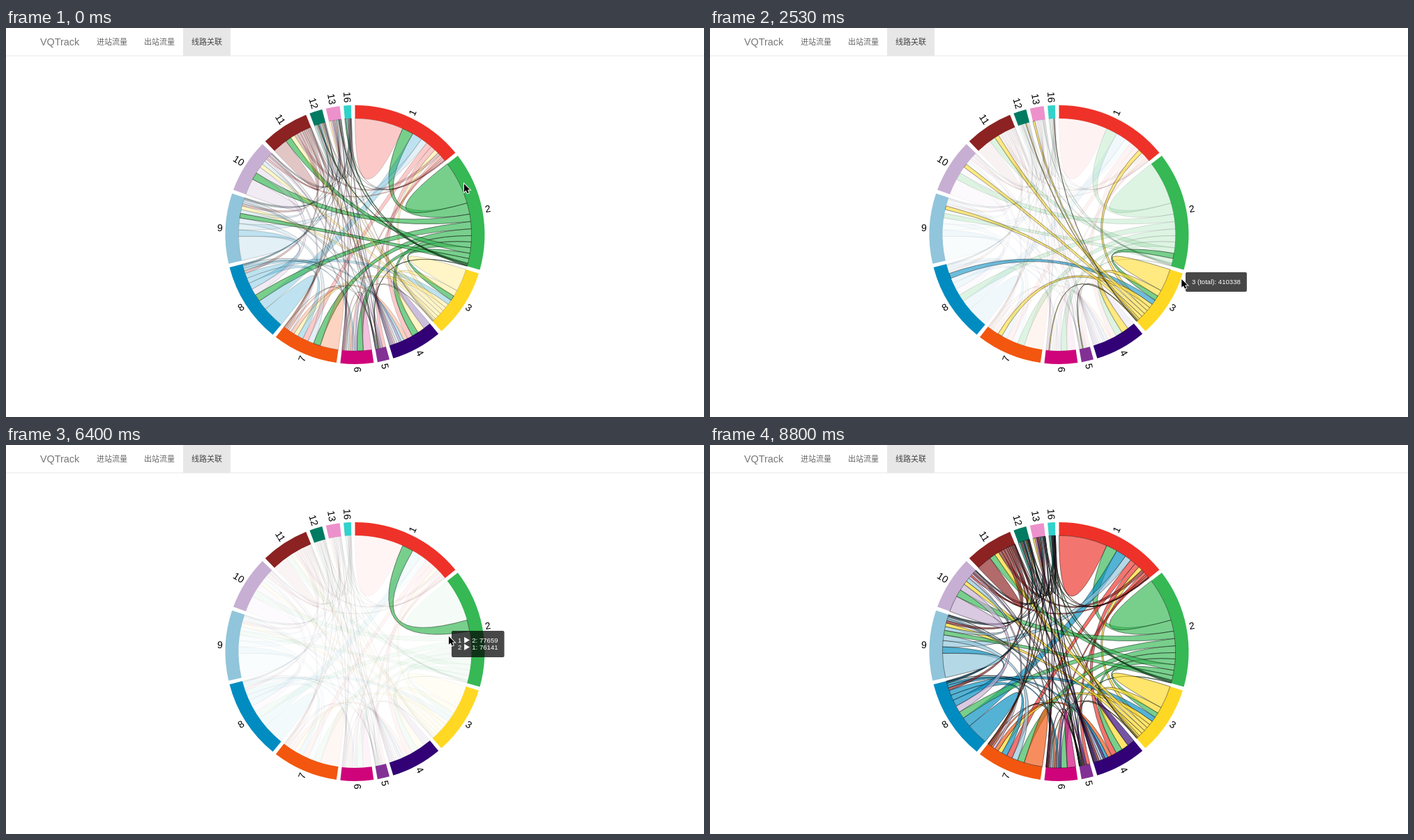
An HTML page with a canvas that plays this animation: 1001 by 559 pixels, repeating every 9400 ms.

```html
<!DOCTYPE html>
<html lang="zh">
<head>
<meta charset="utf-8">
<style>
  html, body { margin: 0; width: 100%; height: 100%; overflow: hidden; background: #fff; }
  canvas { display: block; }
</style>
</head>
<body>
<canvas id="stage" width="1001" height="559"></canvas>
<script>
const ctx = document.getElementById('stage').getContext('2d');
const LOOP = 9400, CX = 500.5, CY = 297, INNER = 167, OUTER = 186, PAD = 1.72;
const SANS = '"Liberation Sans", Arial, sans-serif';
const CJK = '"Noto Sans CJK SC", "Noto Sans CJK", sans-serif';

// id, colour, span in degrees
const lines = [
  [1, '#ee3229', 50.7], [2, '#36b854', 53.3], [3, '#ffd823', 30.8], [4, '#320176', 22.9],
  [5, '#823094', 5.4], [6, '#cf047a', 14.8], [7, '#f3560f', 29.4], [8, '#008cc1', 36],
  [9, '#91c5db', 31.5], [10, '#c7afd3', 24.2], [11, '#8c2222', 21.6], [12, '#007b61', 5.8],
  [13, '#ec91cc', 6.2], [16, '#32d2ca', 3.3]
].map(([id, color, span]) => ({ id, color, span }));

// Traffic between lines: upper triangle, each row starts with the line itself
const flow = [
  [24.3, 5.6, 2.1, 2.5, 1.4, .9, 2.8, 5.1, 3.2, .9, 1.5, .2, .2, .3],
  [21.8, 2.65, 3.1, .2, 2.9, 3.4, 3.6, 2.35, 3.7, 2.75, .5, .3, .5],
  [12, 3.3, .25, .4, 2.15, 2.6, 1.9, 1.95, 2, .35, .9, .1],
  [3.5, .8, 1.1, 1.8, 1.3, 1, .9, .9, .4, .6, .2],
  [.3, .35, .2, .2, .2, .15, .1, .2, .1, .05],
  [4, .9, 1, .9, .6, .4, .2, .3, .1],
  [9, 2.7, 2.85, 1.2, .9, .3, .5, .15],
  [11, 3.3, 3.35, 1.4, .4, .4, .2],
  [12.4, 1.92, 1.3, .4, .4, .15],
  [8.2, .8, .2, .4, .1],
  [7, .6, .6, .1],
  [1, .3, .1],
  [.7, .1],
  [.4]
];
const traffic = (i, j) => flow[Math.min(i, j)][Math.abs(i - j)];

// The line that gives a ribbon its colour
const priority = [2, 8, 3, 11, 9, 1, 10, 7, 4, 6, 12, 13, 5, 16];
function dominant(a, b) {
  if (a.id === 8 && (b.id === 10 || b.id === 11)) return b;
  return priority.indexOf(a.id) < priority.indexOf(b.id) ? a : b;
}

const rad = deg => (deg - 90) * Math.PI / 180;

// Place the groups, and within each one its ribbons from wide to narrow
let cursorAngle = 0;
lines.forEach((line, i) => {
  line.start = cursorAngle;
  cursorAngle += line.span + PAD;
  const parts = lines.map((_, j) => ({ j, value: traffic(i, j) })).sort((p, q) => q.value - p.value);
  const total = parts.reduce((sum, p) => sum + p.value, 0);
  let at = line.start;
  line.ends = [];
  for (const p of parts) {
    const next = at + p.value / total * line.span;
    line.ends[p.j] = [rad(at), rad(next)];
    at = next;
  }
});

function ribbon(from, to) {
  const path = new Path2D();
  const curveTo = a => path.quadraticCurveTo(0, 0, INNER * Math.cos(a), INNER * Math.sin(a));
  path.arc(0, 0, INNER, ...from);
  if (from !== to) {
    curveTo(to[0]);
    path.arc(0, 0, INNER, ...to);
  }
  curveTo(from[0]);
  path.closePath();
  return path;
}

const chords = [];
lines.forEach((a, i) => {
  for (let j = i; j < lines.length; j++) {
    const b = lines[j];
    chords.push({
      ids: [a.id, b.id], key: a.id + '-' + b.id, color: dominant(a, b).color,
      path: ribbon(a.ends[j], b.ends[i])
    });
  }
});

// Periods of movement: start, end, number of steps; the picture rests in between
const bursts = [
  [150, 1020, 6], [1200, 2230, 8], [2380, 2830, 4], [3730, 4770, 8], [4920, 5070, 2],
  [5510, 5950, 4], [6400, 6690, 3], [6990, 7590, 5], [7880, 8800, 7]
];
function stepped(t) {
  const burst = bursts.filter(b => b[0] <= t).pop();
  if (!burst) return 0;
  const [start, end, count] = burst, size = (end - start) / (count - 1);
  return start + Math.min(count - 1, Math.floor((t - start) / size)) * size;
}

// time, hovered part, pointer x, y, tooltip x, y
const poses = [
  [0, '2', 657, 224],
  [840, '2', 671, 262, 676, 252],
  [1200, '2', 672, 267, 677, 257],
  [2230, '2', 680, 322, 685, 312],
  [2380, '3', 677, 356, 683, 346],
  [2830, '3', 675, 371, 680, 361],
  [3730, '3', 667, 316, 680, 361],
  [3870, '2', 666, 300, 671, 292],
  [4320, '2', 662, 262, 667, 254],
  [4470, '2-2', 642, 245, 647, 250],
  [4770, '2-2', 619, 235, 637, 245],
  [5070, '2-2', 619, 235, 637, 245],
  [5510, '1-2', 628, 258, 634, 250],
  [5950, '1-2', 635, 275, 639, 267],
  [6400, '1-2', 635, 275, 639, 267],
  [6540, '2-10', 636, 277, 641, 277],
  [6690, '2-10', 637, 278, 642, 279],
  [6990, '2-8', 636, 283, 645, 288],
  [7590, '2-8', 635, 285, 645, 290],
  [7880, 'all', 650, 293],
  [8800, 'all', 1012, 565]
].map(([time, hover, x, y, tipX, tipY]) => ({ time, hover, x, y, tipX, tipY }));

const tips = {
  '2': ['2 (total): 727177'],
  '3': ['3 (total): 410338'],
  '2-2': ['2 ▶ 2: 297204'],
  '1-2': ['1 ▶ 2: 77659', '2 ▶ 1: 76141'],
  '2-10': ['10 ▶ 2: 51874', '2 ▶ 10: 50392'],
  '2-8': ['8 ▶ 2: 51109', '2 ▶ 8: 49865']
};

const mix = (a, b, k) => a + (b - a) * k;
const isLit = (chord, hover) => hover === 'all' || chord.key === hover || chord.ids.some(id => String(id) === hover);

function text(str, x, y, font, color, align = 'left') {
  ctx.font = font;
  ctx.fillStyle = color;
  ctx.textAlign = align;
  ctx.fillText(str, x, y);
}

function drawNav() {
  ctx.fillStyle = '#e7e7e7';
  ctx.fillRect(0, 39.5, 1001, 1);
  ctx.fillRect(254, 0, 68, 40);
  ctx.textBaseline = 'alphabetic';
  text('VQTrack', 49, 24.5, '14.4px ' + SANS, '#777');
  text('进站流量', 130, 24, '11px ' + CJK, '#666');
  text('出站流量', 198, 24, '11px ' + CJK, '#666');
  text('线路关联', 266, 24, '11px ' + CJK, '#444');
}

function drawRing() {
  ctx.textBaseline = 'middle';
  for (const { id, color, start, span } of lines) {
    ctx.fillStyle = color;
    ctx.beginPath();
    ctx.arc(0, 0, OUTER, rad(start), rad(start + span));
    ctx.arc(0, 0, INNER, rad(start + span), rad(start), true);
    ctx.fill();

    const middle = start + span / 2, flip = middle > 180;
    ctx.save();
    ctx.rotate(rad(middle));
    ctx.translate(190, 0);
    if (flip) ctx.rotate(Math.PI);
    text(id, 0, 0.5, '14px ' + SANS, '#000', flip ? 'right' : 'left');
    ctx.restore();
  }
}

function drawChords(t, index) {
  const hover = poses[index].hover;
  let first = index;
  while (first > 0 && poses[first - 1].hover === hover) first--;
  const before = first ? poses[first - 1].hover : hover;
  const fade = first ? Math.min(1, (t - poses[first].time + 100) / 300) : 1;
  const dim = .07 + .31 * Math.exp(-t / 900);

  ctx.strokeStyle = '#000';
  ctx.lineWidth = .45;
  for (const chord of chords) {
    const alpha = mix(isLit(chord, before) ? 1 : dim, isLit(chord, hover) ? 1 : dim, fade);
    ctx.globalAlpha = alpha * .67;
    ctx.fillStyle = chord.color;
    ctx.fill(chord.path);
    ctx.globalAlpha = alpha;
    ctx.stroke(chord.path);
  }
  ctx.globalAlpha = 1;
}

function drawTip(rows, x, y) {
  ctx.font = '9.6px ' + SANS;
  const width = 18 + Math.max(...rows.map(row => ctx.measureText(row).width));
  ctx.fillStyle = 'rgba(0,0,0,.72)';
  ctx.beginPath();
  ctx.roundRect(x, y, width, 18 + 10 * rows.length, 2);
  ctx.fill();
  ctx.textBaseline = 'middle';
  rows.forEach((row, i) => text(row, x + 9, y + 14.5 + 10 * i, '9.6px ' + SANS, '#fff'));
}

const arrow = new Path2D('M0 0V11.8L2.7 9.3L4.6 13.6L6.7 12.7L4.9 8.5H8.5Z');
function drawPointer(x, y) {
  ctx.save();
  ctx.translate(x, y);
  ctx.lineWidth = 1.8;
  ctx.strokeStyle = '#fff';
  ctx.stroke(arrow);
  ctx.fillStyle = '#000';
  ctx.fill(arrow);
  ctx.restore();
}

function draw(now) {
  const t = stepped(now % LOOP);
  const index = poses.filter(p => p.time <= t + .01).length - 1;
  const pose = poses[index], next = poses[index + 1] || pose;
  const k = next === pose ? 0 : Math.max(0, (t - pose.time) / (next.time - pose.time));

  ctx.fillStyle = '#fff';
  ctx.fillRect(0, 0, 1001, 559);
  drawNav();
  ctx.save();
  ctx.translate(CX, CY);
  drawRing();
  drawChords(t, index);
  ctx.restore();

  if (pose.tipX) {
    const follow = next.hover === pose.hover ? k : 0;
    drawTip(tips[pose.hover], mix(pose.tipX, next.tipX || 0, follow), mix(pose.tipY, next.tipY || 0, follow));
  }
  drawPointer(mix(pose.x, next.x, k), mix(pose.y, next.y, k));
}

const begin = performance.now();
function tick() {
  draw(performance.now() - begin);
  requestAnimationFrame(tick);
}
tick();
</script>
</body>
</html>
```
